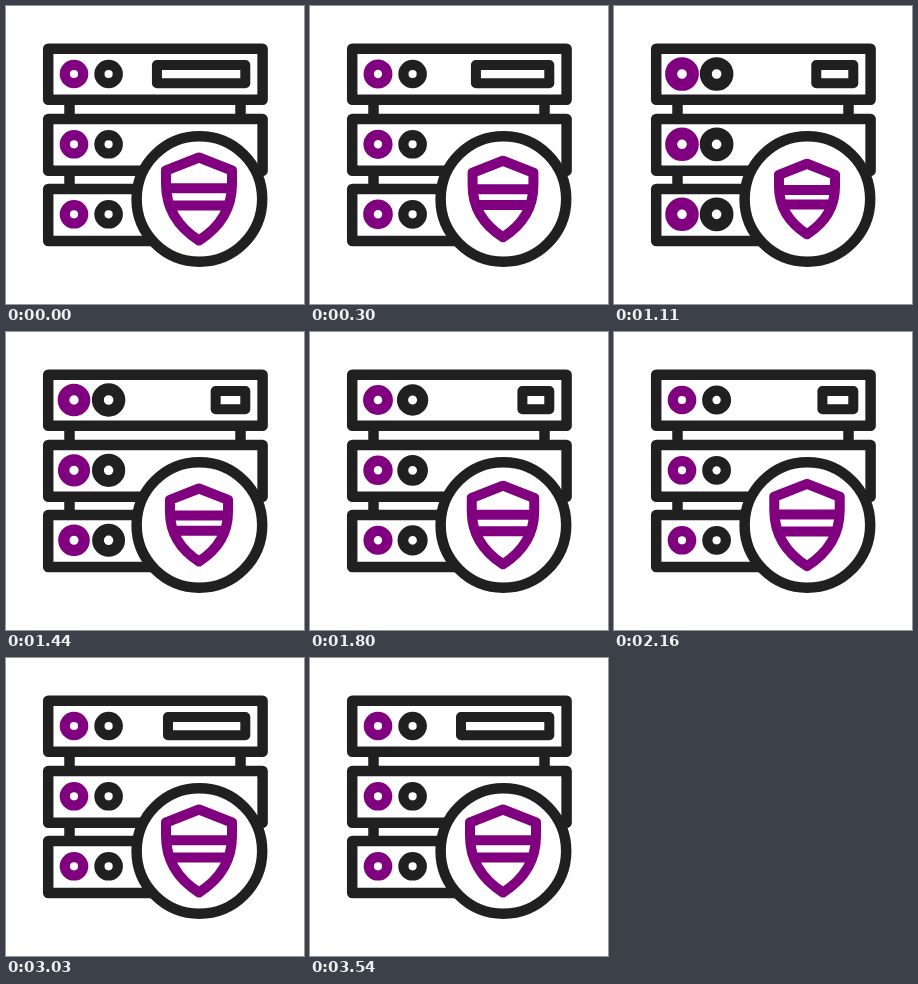
An HTML page for the animation above (3600 ms loop, 298 px wide and 298 px high).

```html
<!DOCTYPE html>
<html lang="en">
<head>
<meta charset="utf-8">
<title>Secure server</title>
<style>
  html, body { margin: 0; width: 100%; height: 100%; overflow: hidden; background: #fff; }
  svg { display: block; width: 100%; height: 100%; }
  .ink, .accent { fill: none; stroke: #202020; stroke-width: 10.5; stroke-linejoin: round; }
  .accent { stroke: #800080; stroke-width: 10; }
  #slot { stroke-width: 10; }
  .light { stroke-width: 10.2; }
</style>
</head>
<body>
<svg viewBox="0 0 298 298">
  <g class="ink">
    <path d="M63.5 94V112M234.5 94V112M63.5 164V182"/>
    <rect x="42.2" y="42.8" width="214.4" height="51"/>
    <rect x="42.2" y="113" width="214.4" height="51.7"/>
    <path d="M150 182.9H42.2V235H150"/>
    <path id="slot"/>
    <circle class="light" cx="102.6" cy="208.3" r="9.2"/>
    <circle class="light" cx="102.6" cy="138.3" r="9.2"/>
    <circle class="light" cx="102.6" cy="68" r="9.2"/>
    <circle cx="193.4" cy="193" r="62.8" fill="#fff"/>
  </g>
  <g class="accent">
    <circle class="light" cx="68" cy="208.3" r="9.2"/>
    <circle class="light" cx="68" cy="138.3" r="9.2"/>
    <circle class="light" cx="68" cy="68" r="9.2"/>
    <path id="shield" d="M193 151.5L226 164.5V178C226 203 214 221 193 234.5C172 221 160 203 160 178V164.5ZM161 182.3H225M166 199.6H220"/>
  </g>
</svg>
<script>
const LOOP = 3600;
const slot = document.getElementById("slot");
const shield = document.getElementById("shield");
const lights = document.querySelectorAll(".light");

// Timing curve like CSS cubic-bezier(), solved by bisection.
function bezier(x1, y1, x2, y2) {
  const at = (a, b, t) => 3 * (1 - t) ** 2 * t * a + 3 * (1 - t) * t * t * b + t ** 3;
  return x => {
    let low = 0, high = 1;
    for (let i = 0; i < 24; i++) {
      const mid = (low + high) / 2;
      if (at(x1, x2, mid) < x) low = mid; else high = mid;
    }
    return at(y1, y2, (low + high) / 2);
  };
}
const quickStart = bezier(0.167, 0.167, 0.5, 1);
const smooth = bezier(0.5, 0, 0.5, 1);
const clamp = x => Math.min(1, Math.max(0, x));

// Goes 0 to 1 until the peak, then returns to 0 at the end.
function swing(time, peak, end, rise) {
  if (time < peak) return rise(clamp(time / peak));
  return 1 - smooth(clamp((time - peak) / (end - peak)));
}

function scaleAbout(el, x, y, s) {
  el.setAttribute("transform", `translate(${x} ${y}) scale(${s}) translate(${-x} ${-y})`);
}

function draw(now) {
  const time = now % LOOP;
  const left = 150.9 + 61.5 * swing(time, 1800, LOOP, quickStart);
  slot.setAttribute("d", `M${left} 59H239.3V77.3H${left}Z`);

  // The shield shrinks but keeps its line weight.
  const size = 1 - 0.155 * swing(time, 900, 2450, quickStart);
  scaleAbout(shield, 193, 193, size);
  shield.style.strokeWidth = 10 / size;

  // Lights swell from the bottom row up, the outer column first.
  lights.forEach((light, i) => {
    const delay = (i % 3) * 70 + (i < 3 ? 180 : 0);
    const x = light.cx.baseVal.value, y = light.cy.baseVal.value;
    scaleAbout(light, x, y, 1 + 0.18 * swing(time - delay, 900, 2100, smooth));
  });
}

const start = performance.now();
function tick() {
  draw(performance.now() - start);
  requestAnimationFrame(tick);
}
tick();
</script>
</body>
</html>
```
